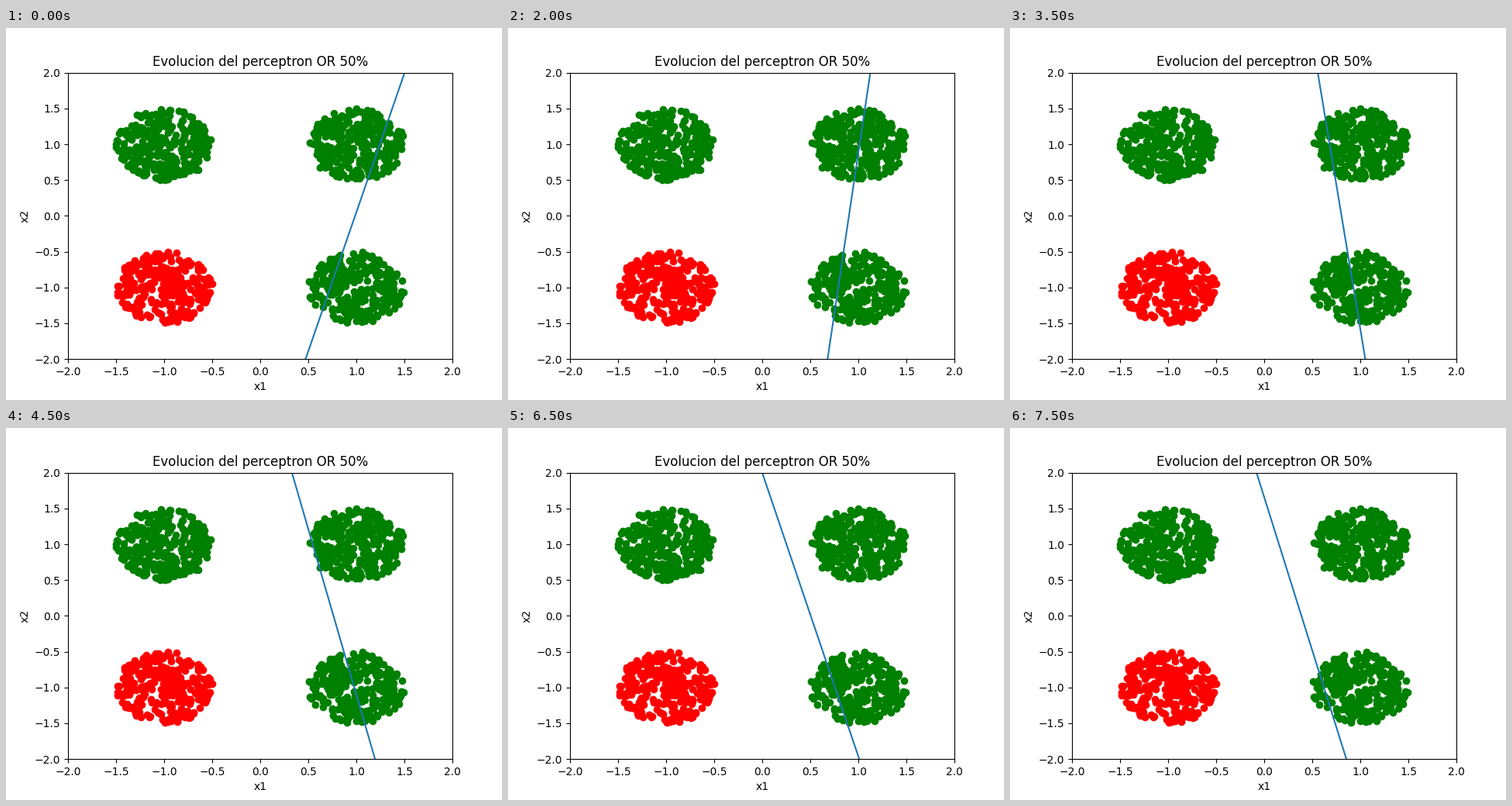
These frames come from a looping animation (640x480 px, 8 s). A matplotlib script:

```python
import numpy as np
import matplotlib.pyplot as plt
from matplotlib.animation import FuncAnimation

EPOCHS = 16
STEP_MS = 500
RADIUS = 0.5

rng = np.random.default_rng(12)

# Key epochs of the boundary: where it crosses y = 2 and y = -2.
# It swings evenly at first, then jumps back and forth after epoch 8.
KEYS = {
    0: (1.503, .472), 1: (1.3, .512), 4: (1.125, .68), 6: (.76, .89),
    8: (.355, 1.214), 9: (.33, 1.195), 10: (.141, 1.343), 11: (.172, 1.096),
    12: (.185, 1.218), 13: (0, 1.01), 14: (-.181, 1.137), 15: (-.08, .855),
}


def disc(cx, cy, n):
    """Points spread uniformly over a disc."""
    r = RADIUS * np.sqrt(rng.random(n))
    a = 2 * np.pi * rng.random(n)
    return cx + r * np.cos(a), cy + r * np.sin(a)


def boundary(epoch):
    """Crossings of the decision boundary at y = 2 and y = -2."""
    return [np.interp(epoch, list(KEYS), xs) for xs in zip(*KEYS.values())]


fig, ax = plt.subplots(figsize=(6.4, 4.8), dpi=100)

for cx in (-1, 1):
    for cy in (-1, 1):
        is_true = cx > 0 or cy > 0
        ax.scatter(*disc(cx, cy, 290), color="green" if is_true else "red")

line, = ax.plot([], [], color="tab:blue")
ax.set(xlim=(-2, 2), ylim=(-2, 2), xlabel="x1", ylabel="x2",
       title="Evolucion del perceptron OR 50%")


def update(epoch):
    top, bottom = boundary(epoch)
    y = np.array([-3, 3])
    line.set_data((top + bottom) / 2 + (top - bottom) * y / 4, y)
    return line,


anim = FuncAnimation(fig, update, frames=EPOCHS, interval=STEP_MS,
                     repeat=True, repeat_delay=0)
plt.show()
```
